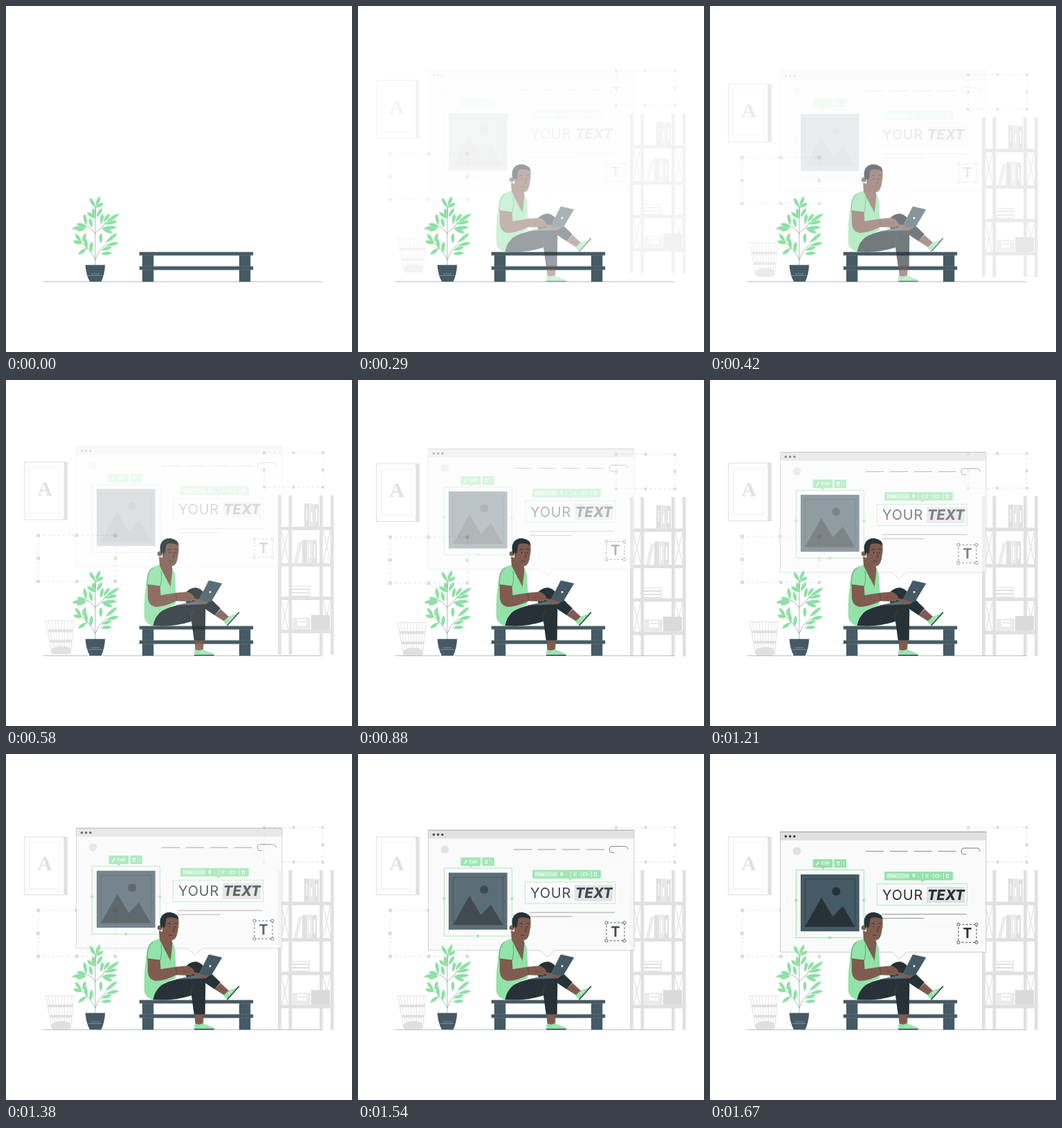
Animation of 500x500 px, one loop 1.71 s. Source, as an HTML page with a canvas:

```html
<!DOCTYPE html>
<html lang="en">
<head>
<meta charset="utf-8">
<title>Page builder</title>
<style>
html, body { margin: 0; width: 100%; height: 100%; overflow: hidden; background: #fff; }
canvas { display: block; width: 100vw; height: 100vh; }
</style>
</head>
<body>
<canvas id="stage" width="500" height="500"></canvas>
<script>
const LOOP = 1710, BLANK = 130, LEAD = 30, SLIDE = 20;
const GREEN = '#92e3a9', SLATE = '#455a64', INK = '#263238', GREY = '#e0e0e0', SKIN = '#7f5b50';

const stage = document.getElementById('stage').getContext('2d');
const scratch = document.createElement('canvas');
scratch.width = scratch.height = 500;
const layer = scratch.getContext('2d');
let g = stage;

function rect(x, y, w, h, color) {
  g.fillStyle = color;
  g.fillRect(x, y, w, h);
}
function box(x, y, w, h, color, width = 0.6, dash = []) {
  g.strokeStyle = color;
  g.lineWidth = width;
  g.setLineDash(dash);
  g.strokeRect(x, y, w, h);
  g.setLineDash([]);
}
function fill(d, color) {
  g.fillStyle = color;
  g.fill(new Path2D(d));
}
function line(d, color, width = 0.6) {
  g.strokeStyle = color;
  g.lineWidth = width;
  g.stroke(new Path2D(d));
}
function round(x, y, w, h, r, color) {
  g.fillStyle = color;
  g.beginPath();
  g.roundRect(x, y, w, h, r);
  g.fill();
}
function dot(x, y, r, color, outline) {
  g.beginPath();
  g.arc(x, y, r, 0, 7);
  g.fillStyle = color;
  g.fill();
  if (outline) {
    g.strokeStyle = outline;
    g.lineWidth = 0.8;
    g.stroke();
  }
}
function text(s, x, y, font, color, spacing = 0, align = 'left') {
  g.font = font;
  g.fillStyle = color;
  g.textAlign = align;
  g.letterSpacing = spacing + 'px';
  g.fillText(s, x, y);
}

// Cubic bezier easing, solved by bisection
function bezier(x1, y1, x2, y2) {
  const at = (a, b, s) => 3 * (1 - s) * (1 - s) * s * a + 3 * (1 - s) * s * s * b + s * s * s;
  return x => {
    if (x >= 1) return 1;
    let lo = 0, hi = 1;
    for (let i = 0; i < 24; i++) {
      const mid = (lo + hi) / 2;
      if (at(x1, x2, mid) < x) lo = mid; else hi = mid;
    }
    return at(y1, y2, lo);
  };
}
const overshoot = bezier(0.36, -0.01, 0.5, 1.38);
const easeIn = bezier(0.42, 0, 1, 1);

function dashedSelection(x, y, w, h, size) {
  box(x, y, w, h, GREY, 0.9, [3.5, 3.5]);
  for (const i of [0, 0.5, 1]) for (const j of [0, 0.5, 1]) {
    if (i === 0.5 && j === 0.5) continue;
    rect(x + w * i - size / 2, y + h * j - size / 2, size, size, '#dadada');
  }
}

function drawPoster() {
  rect(26.5, 120, 58, 83.5, '#fff');
  box(26.5, 120, 58, 83.5, GREY, 1);
  rect(83.5, 119.5, 5.3, 84.5, GREY);
  box(33.5, 128, 44, 66.5, '#ebebeb', 0.7);
  line('M26.5 120L33.5 128M84 120L77.5 128M26.5 203L33.5 194.5M84 203L77.5 194.5', '#ebebeb');
  text('A', 56, 168.3, 'bold 30px "Liberation Serif", serif', GREY, 0, 'center');
}

function drawBasket() {
  line('M57 349.3H98.5M57.5 349L66 396.5M98 349L93.5 396.5', GREY, 1);
  for (let i = 1; i < 9; i++) line(`M${57 + i * 4.6} 349L${66 + i * 3.1} 397`, GREY, 0.8);
  fill('M60 362H97L96 366H61ZM62.5 377H95.5L94.5 381H63.5ZM66 390Q79 382 93 389L93 396Q92 398 89 398H69Q66 398 65.5 394Z', GREY);
}

function drawShelf() {
  for (const y of [218, 319.5]) {
    for (const x of [397.5, 458]) {
      line(`M${x} ${y}L${x + 11} ${y + 47}M${x + 11} ${y}L${x} ${y + 47}`, GREY, 1.2);
    }
  }
  for (const x of [393, 408.5, 453, 469]) rect(x, 168, 4.8, 230.5, GREY);
  for (const y of [213.5, 266, 314.5, 362.5]) rect(397, y, 73, 5, GREY);

  rect(431, 180, 7, 33.5, GREY);
  rect(438.5, 180, 6.5, 33.5, '#e8e8e8');
  rect(445.3, 181, 6.7, 32.5, GREY);
  rect(433.5, 187, 2, 17, '#f2f2f2');
  rect(440.5, 193, 2, 13, '#fff');
  rect(447.7, 188, 2, 18, '#fff');

  fill('M416 266L423 235L428 236L421 266Z', '#ebebeb');
  rect(428, 232.5, 7, 33.5, GREY);
  rect(435.6, 232, 6.5, 34, '#ebebeb');
  rect(442.3, 233, 7, 33, GREY);
  rect(437.6, 239, 2, 20, '#fff');
  rect(444.7, 239, 2, 20, '#fff');

  for (let i = 0; i < 3; i++) {
    box(410 - i % 2, 299.5 + i * 5, 28.5, 4.3, GREY, 1);
    rect(410, 303 + i * 5, 28, 1.2, GREY);
  }

  rect(414, 345, 26, 17.5, '#ebebeb');
  rect(421, 347.5, 13, 9, '#fff');
  rect(423, 350, 10, 1.5, GREY);
  fill('M441 341H468V361L464 362.5H441Z', '#dadada');
}

function drawBackdrop() {
  drawPoster();
  drawBasket();
  drawShelf();
  dashedSelection(373, 106.3, 84.7, 50, 4);
  dashedSelection(46.5, 226, 111.5, 66.5, 4.8);
}

function trash(x, y) {
  box(x - 1.5, y - 1.7, 3, 4, '#fff', 0.8);
  line(`M${x - 2.4} ${y - 2.2}H${x + 2.4}`, '#fff', 0.8);
}

function drawPicture() {
  box(124.5, 167.5, 98, 98, GREEN, 0.9);
  for (const [x, y] of [[124.5, 211.5], [222.5, 211.5], [173, 265.5]]) {
    rect(x - 1.8, y - 1.8, 3.6, 3.6, GREEN);
  }
  rect(131, 174, 84.7, 82.3, SLATE);
  box(137.3, 180.5, 72, 69, INK, 0.6);
  fill('M137.3 249.3L161 207.5L177.5 235L192 220L209.3 249.3Z', INK);
  dot(182.3, 198.5, 6, INK);

  round(148.5, 152, 28.8, 12.3, 1, GREEN);
  fill('M160 164H166L163 167Z', GREEN);
  line('M153.5 160.5L157.6 156.2M153 161L154.5 160.7', '#fff', 1.3);
  text('Edit', 161, 160.4, '600 5.8px Inter, sans-serif', '#fff', 0.4);
  round(179.5, 152, 17.5, 12.3, 1, GREEN);
  trash(185.2, 158.2);
  line('M190.3 153.5V163', '#d3f4dc', 0.6);
  for (const y of [156, 158.2, 160.4]) dot(193.8, y, 0.6, '#fff');
}

function drawHeadline() {
  round(252, 170, 99, 12.4, 1.5, GREEN);
  fill('M304 182H310L307 185.5Z', GREEN);
  round(255, 172.5, 33, 7.3, 0.6, '#bdeeca');
  text('Title', 257.5, 178.2, '500 5.2px Inter, sans-serif', '#fff', 0.2);
  line('M282.5 175.5L284 177L285.5 175.5M301 175.5V177M319 176H320.5M333.5 176H335', '#fff', 0.8);
  text('B', 292.6, 178.4, '800 6px Inter, sans-serif', '#fff');
  line('M307.3 172V180.5M322.8 172V180.5M337.5 172V180.5', '#fff', 0.7);
  line('M311.5 174.5H316M311.5 176.3H314.5M311.5 178H316', '#fff', 0.8);
  box(325.5, 174.5, 5.5, 3.3, '#fff', 0.8);
  trash(343, 176.3);

  box(241.5, 187.5, 130, 31, GREEN, 0.7);
  rect(313, 191.8, 55, 23.4, GREY);
  text('YOUR', 249, 210.6, '400 20px Inter, sans-serif', INK, 0.8);
  text('TEXT', 314, 210.6, 'italic 800 20px Inter, sans-serif', INK);
  line('M248.5 231.5H371M248.5 237.4H309.5', INK, 0.5);
  line('M308 250.3H358', '#eee', 0.5);
}

function drawWindow() {
  fill('M101.5 112.5H399V286.3H284L273.5 296L263 286.3H101.5Z', '#fafafa');
  rect(101.5, 112.5, 297.5, 12.3, GREY);
  line('M101.5 112.5H399V286.3H284L273.5 296L263 286.3H101.5Z', '#b0b5b7', 0.7);
  line('M101.5 112.5H399', '#818a8e', 0.6);
  for (const x of [109.5, 115.7, 121.9]) dot(x, 119, 1.7, INK);
  dot(125.5, 140.2, 5.8, GREY);
  for (let i = 0; i < 4; i++) line(`M${225 + i * 34.9} 140.5h26.2`, INK, 0.55);
  line('M390 140.5Q390 136 385.5 136H367.5Q363.2 136 363.2 140.5T367.5 145H370.5', INK, 0.65);
  drawPicture();
  drawHeadline();
  box(359, 246.3, 26, 26, INK, 0.9, [3, 2.4]);
  for (const x of [359, 385]) for (const y of [246.3, 272.3]) dot(x, y, 2.1, '#fafafa', INK);
  text('T', 372, 266.3, '700 19.5px Inter, sans-serif', INK, 0, 'center');
}

// Each leaf: base x, base y, tip x, tip y
const leaves = [
  [129, 291, 121, 277], [130, 289, 136, 275], [130, 291, 141, 285],
  [127, 305, 126, 292], [131, 305, 139, 292], [129, 307, 117, 298],
  [116, 317, 113, 300], [124, 320, 121, 306], [116, 318, 102, 315],
  [114, 319, 95, 322], [116, 320, 102, 325],
  [137, 315, 140, 300], [141, 312, 150, 300], [145, 312, 164, 300],
  [142, 315, 161, 311], [138, 321, 161, 320], [139, 322, 154, 328],
  [109, 342, 100, 329], [110, 343, 97, 340], [111, 341, 115, 328],
  [117, 352, 114, 334], [122, 357, 124, 340], [117, 350, 104, 359],
  [137, 343, 137, 328], [144, 342, 161, 328], [145, 346, 163, 342],
  [138, 353, 153, 348], [137, 358, 153, 357]
];

function drawPlant() {
  line('M129 375V289M129 367Q122 352 110 342M129 367Q134 352 145 345M129 330Q125 320 114 318M129 328Q138 322 145 312M129 306L130 289', '#77878a', 0.6);
  for (const [x, y, tipX, tipY] of leaves) {
    const dx = tipX - x, dy = tipY - y;
    const bulge = 5.3 / Math.hypot(dx, dy);
    const side = k => `${x + dx * 0.58 - dy * bulge * k} ${y + dy * 0.58 + dx * bulge * k}`;
    fill(`M${x} ${y}Q${side(1)} ${tipX} ${tipY}Q${side(-1)} ${x} ${y}Z`, GREEN);
    line(`M${x} ${y}L${x + dx * 0.8} ${y + dy * 0.8}`, '#7ccb93', 0.4);
  }
  fill('M114.7 374.3H143.2Q142.5 388 137.7 398.3H121Q115.5 388 114.7 374.3Z', SLATE);
  line('M118.5 389.5H139.5M123 387H135.5', '#9eabb0', 0.6);
}

function drawBench() {
  for (const x of [197, 337]) {
    rect(x, 360, 16.3, 38.5, SLATE);
    line(`M${x + 2} 396L${x + 14} 384M${x + 3} 372L${x + 13} 362`, '#51656e', 0.4);
  }
  rect(192.7, 355.5, 164.5, 4.9, SLATE);
  rect(192.7, 376.3, 164.5, 5, SLATE);
  line('M197 360.7H353M197 376H353M197 381.6H353', '#70828a', 0.4);
}

function drawHead() {
  fill('M221 255L222 269L237.5 300L241 275L238 262Z', SKIN);
  fill('M227 236Q238 228 249 236Q250.5 246 248.5 254Q247 268 240 269Q231 269 226 257Z', SKIN);
  dot(222.3, 251, 3.5, SKIN);
  fill('M224.5 253Q220.5 241 225 234Q230 228 239 229Q249 231 249.5 239Q241 234 232.5 237Q230.5 240 230.5 248L227.5 252L226 249Z', INK);
  line('M233.5 246Q236 243.5 238.5 245M243 245Q245.5 243.5 248 245.5', INK, 1);
  dot(236.5, 249.4, 0.9, INK);
  dot(245, 249.6, 0.9, INK);
  line('M241.5 249L243 256H240M235 262.5Q238 260.5 241 262.5', '#40312f', 0.8);
  dot(221.5, 255.5, 0.8, GREEN);
}

function drawPerson() {
  // far leg and raised shoe
  fill('M257 311Q264 300 274 300Q281 301 286 307L310 330L301.5 340L285 329L262 326Z', INK);
  fill('M301.5 340L310 331L322 342L316 349Z', SKIN);
  fill('M314 349L323 341Q331 340 336 335L337 337L320 355Z', GREEN);
  line('M337 335.5L319.5 355', INK, 1.3);
  line('M321 344L324 347M324.5 342L327.5 345', '#fff', 0.8);

  // planted foot
  fill('M272.5 374H285.8L285 391H273.5Z', SKIN);
  fill('M272.5 389.5Q279 392 284.5 389Q291 393 298 394.5Q301 396 300.5 398H272Z', GREEN);
  line('M272 397.8H300.8', INK, 1.3);
  line('M284 391.5L281.5 394M287.5 392.8L285 395.3', '#fff', 0.8);

  // near leg
  fill('M212 355Q214 338 226 333Q246 323 276 321Q288 322 288.3 334L287.7 376.2H271.8L268 349Q245 356 226 355.5Z', INK);
  line('M268 349Q266 340 271 334', '#4d5b61', 0.5);

  // shirt
  drawHead();
  fill('M221 267Q207 271 204 284L200.5 310Q199 338 200.5 346Q205 354 212.5 355Q215 341 226 333L245 324Q246 305 244.3 284Q244 277 240.3 274L238.5 300L221.5 268Z', GREEN);
  line('M221.5 268L238 300L240.5 275', '#6fb886', 0.6);

  // near arm
  fill('M204.5 295H222.5L223.5 311L246 307.5L262 306Q270 308 273 316L268 320L246 319.5Q230 327.5 216 328Q206 326 205 315Z', SKIN);
  fill('M204 283Q207 269 218 269Q225 274 224.5 284L223 298L203 295.5Z', GREEN);
  line('M203 295.5L223 298Q226 284 224 276', INK, 0.4);
  line('M204 295Q204 277 212 272', INK, 0.4);
  line('M246 308V319', '#55403b', 0.7);
  line('M253 315Q260 312 266 316', '#55403b', 0.5);

  // laptop
  fill('M243 326.5L280 318L296 319L288 324L252 325.5Z', '#5d7079');
  fill('M292.8 290Q293.5 289.5 295 290L312.3 294L297 319.5Q294 321 278.5 318.5Z', SLATE);
  line('M293 290L278.5 318.5', '#718189', 0.6);
  dot(295, 306.5, 1.4, '#fff');
  fill('M267 316Q276 315 282 318L289 320Q293 323 288 324L276 321Z', SKIN);
}

function drawLayer(draw, alpha, dy = 0) {
  if (alpha <= 0) return;
  g = layer;
  g.setTransform(1, 0, 0, 1, 0, 0);
  g.clearRect(0, 0, 500, 500);
  g.translate(0, dy);
  draw();
  g = stage;
  g.globalAlpha = Math.min(1, alpha);
  g.drawImage(scratch, 0, 0);
  g.globalAlpha = 1;
}

function render(ms) {
  g = stage;
  rect(0, 0, 500, 500, '#fff');
  const shown = ms >= BLANK;
  const time = ms + LEAD;
  if (shown) {
    const back = overshoot(time / 1000);
    const page = easeIn(time / 1700);
    drawLayer(drawBackdrop, back, (back - 1) * SLIDE);
    drawLayer(drawWindow, page, (page - 1) * SLIDE);
  }
  line('M53.5 398.5H457', '#b4b9bb', 0.9);
  drawPlant();
  drawBench();
  if (shown) drawLayer(drawPerson, time / 700);
}

function tick() {
  render(performance.now() % LOOP);
  requestAnimationFrame(tick);
}
tick();
</script>
</body>
</html>
```
